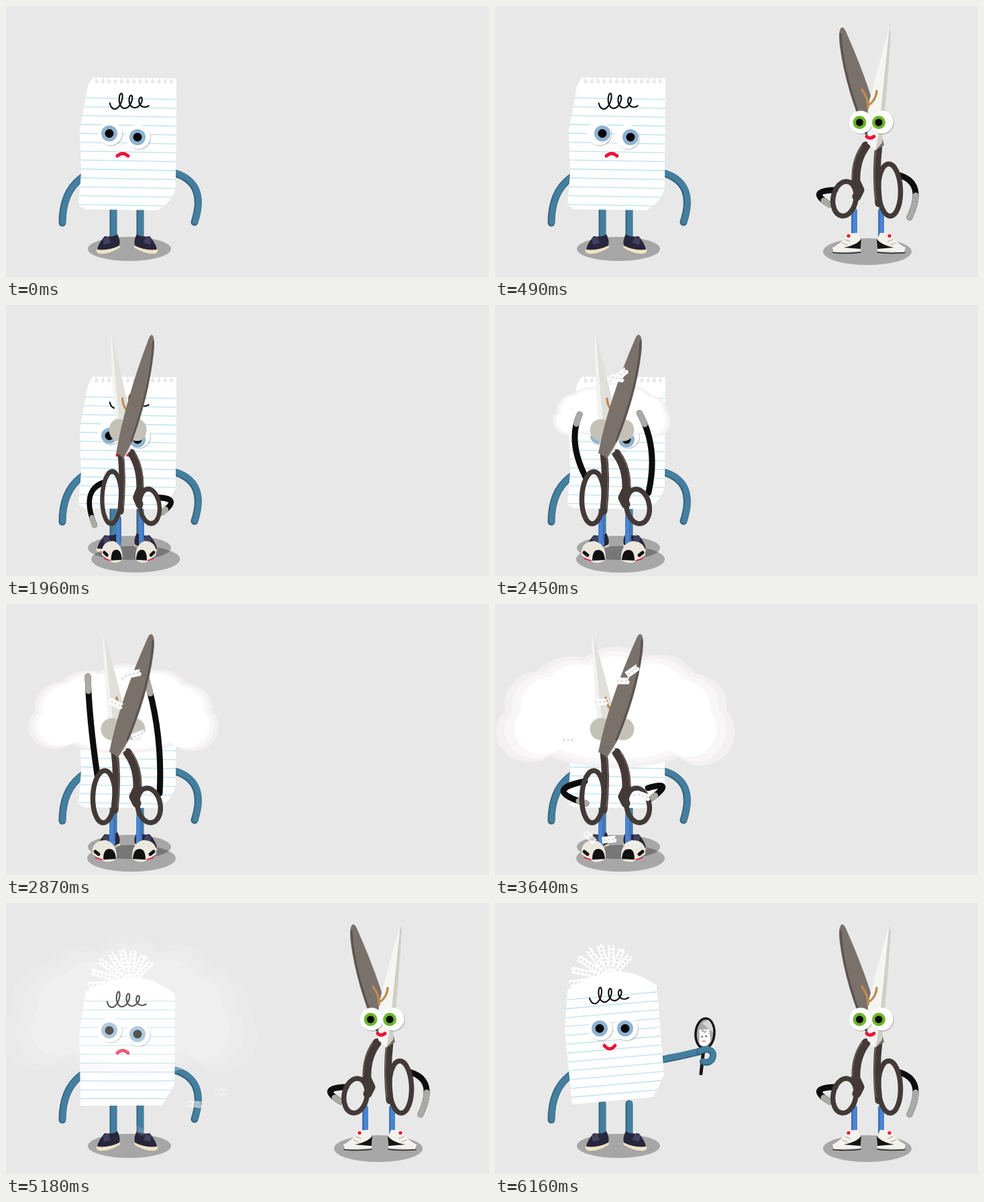
Recreate the animation shown at these times as an HTML page. Size 720x405 px, loop 6.3 s.

```html
<!DOCTYPE html>
<html lang="en">
<head>
<meta charset="utf-8">
<title>Paper and scissors</title>
<style>
html, body { margin: 0; height: 100%; overflow: hidden; background: #e8e8e8; }
svg { display: block; width: 100vw; height: 100vh; }
</style>
</head>
<body>
<svg id="stage" viewBox="0 0 720 405"></svg>
<script>
const LOOP = 6300, STEP = 70, BG = '#e8e8e8';
const TEAL = '#457f9f', DARK = '#433a37', RED = '#ed1238';
const stage = document.getElementById('stage');

// Timing and markup helpers
const ramp = (t, a, b) => Math.min(1, Math.max(0, (t - a) / (b - a)));
const smooth = (t, a, b) => { const u = ramp(t, a, b); return u * u * (3 - 2 * u); };
const easeOut = (t, start) => 1 - (1 - ramp(t, start, start + 660)) ** 3;
const hump = (t, a, b) => Math.sin(Math.PI * ramp(t, a, b));
const mix = (a, b, u) => a + (b - a) * u;
const mixAll = (a, b, u) => a.map((v, i) => mix(v, b[i], u));
const rand = seed => { const v = Math.sin(seed * 12.9898) * 43758.5453; return v - Math.floor(v); };
const repeat = (n, draw) => [...Array(n).keys()].map(draw).join('');

const shape = (d, fill, more = '') => `<path d="${d}" fill="${fill}" ${more}/>`;
const line = (d, color, width, more = '') => shape(d, 'none',
  `stroke="${color}" stroke-width="${width}" stroke-linecap="round" stroke-linejoin="round" ${more}`);
const oval = (x, y, rx, ry, fill, more = '') =>
  `<ellipse cx="${x}" cy="${y}" rx="${rx}" ry="${ry}" fill="${fill}" ${more}/>`;
const dot = (x, y, r, fill) => oval(x, y, r, r, fill);
const group = (transform, inner) => `<g transform="${transform}">${inner}</g>`;
const fade = (opacity, inner) => `<g opacity="${opacity}">${inner}</g>`;
const mirrored = (width, inner) => group(`translate(${width}) scale(-1 1)`, inner);
const bend = p => `M${p[0]} ${p[1]}Q${p.slice(2).join(' ')}`;

const tube = (d, width = 11) =>
  line(d, '#35647f', width) + group('translate(.8 -.8)', line(d, TEAL, width - 2.5));

const eye = (x, y, ix, iy, r, iris, irisR, pupilR) =>
  dot(x + 1.3, y + 1.6, r, '#00000030') + dot(x, y, r, '#fff') +
  dot(ix, iy, irisR, iris) + dot(ix, iy, pupilR, '#080808');

// Perforated paper strip, anchored at its left end
const strip = (x, y, angle, length) => group(`translate(${x} ${y}) rotate(${angle})`,
  shape(`M0 -5H${length}l-2 4 3 2 -2 4H0Z`, '#fbfbfb') +
  repeat(Math.floor(length / 6), i => dot(4 + i * 6, 0, 1.7, '#dedede')));

// ---------- Paper ----------
const OLD_SHEET = 'M129 107L254 108 253 272Q247 294 226 305L118 304 108 298 112 250 110 186 122 120Z';
const NEW_SHEET = 'M108 130Q135 110 170 104T241 123L252 257 236 290 115 301 104 190Z';

const rules = tilt => repeat(13, i => {
  const y = 138.3 + i * 13.3;
  return line(`M100 ${y - tilt}L260 ${y + tilt}`, '#b9e3ee', 1.3);
});

// Handwritten loops that get smaller to the right
const scribble = (() => {
  const points = [];
  for (let s = -.2; s < 3.15; s += .04) {
    const rise = (12.5 - 2 * s) * (1 - Math.cos(2 * Math.PI * s));
    points.push([162 + 15 * s + 5.5 * Math.sin(2 * Math.PI * s) + rise * .1, 154 - s - rise]
      .map(v => v.toFixed(1)));
  }
  return line('M' + points.join('L'), '#0c0c0c', 2.1);
})();

function oldSheet() {
  const holes = repeat(13, i => {
    const x = 135 + i * 9.3;
    return dot(x, 113, 2.7, BG) + line(`M${x} 112l${4 * rand(i) - 2} -8`, BG, 1 + rand(i + 9));
  });
  return shape(OLD_SHEET, '#fff') + `<g clip-path="url(#old)">${rules(1.4)}</g>` + holes + scribble;
}

function newSheet(joy) {
  const tuft = repeat(8, i => strip(172, 112, -188 + i * 20, 62 - i * 2.5));
  return group(`translate(${-4 * (1 - joy)} ${2 * (1 - joy)}) rotate(${5 * (1 - joy)} 115 301)`,
    tuft + shape(NEW_SHEET, '#fff') + `<g clip-path="url(#new)">${rules(-7)}</g>` +
    group('rotate(-5 115 301)', scribble));
}

function paperFace(t, joy) {
  const look = 6 * (smooth(t, 280, 490) - smooth(t, 1540, 1890));
  const down = 5 * (smooth(t, 1540, 1890) - smooth(t, 2800, 3500));
  const pair = (x, y) => eye(x, y, x - 1 + look, y + .5 + down, 18, '#8eb2d0', 12, 6.5);
  const mouth = mixAll([166, 224, 174, 217, 182, 224], [163, 213, 171, 223, 179, 213], joy);
  return pair(mix(155, 157, joy), mix(190, 187, joy)) +
    pair(mix(197, 195, joy), mix(195.5, 187, joy)) + line(bend(mouth), RED, 5);
}

const paperShoe =
  shape('M135 363L169 356 170 361Q152 372 139 370 134 369 135 363Z', '#f3e3c3') +
  shape('M147 344Q160 346 166 341 171 350 169 358 154 366 136 364 137 356 147 344Z', '#27263c') +
  shape('M144 347L153 345 156 354 146 357Z', '#42415e');

// Origin at the hand
const mirror = line('M3 -4L-1 33', '#191716', 5) + group('translate(5 -27) rotate(4)',
  oval(0, 0, 14, 22.5, '#a6a8a9', 'stroke="#191716" stroke-width="3.5"') +
  shape('M3 -21Q12 -15 12 -2L-5 -15Z', '#d4d6d6') +
  shape('M-9 -5L6 -7 9 11 2 20 -7 17Z', '#fafafa') +
  line('M-5 -3q2 -3 3 0t4 -1', '#333', .8) +
  dot(-4, 5, 1.3, '#456') + dot(2, 4, 1.3, '#456') + line('M-3 11q2 2 4 0', RED, 1));

function paperArm(t) {
  const hang = [252, 250, 300, 265, 281, 323];
  const hidden = [252, 250, 272, 275, 235, 270];
  const reach = [249, 234, 278, 229, 305, 222];
  const out = smooth(t, 5390, 5670);
  const arm = mixAll(mixAll(hang, hidden, smooth(t, 5180, 5390)), reach, out);
  const [x, y] = arm.slice(4);
  const held = group(`translate(${x + 3} ${y})`, mirror) +
    tube(`M${x} ${y}c10 -6 21 -3 20 7c-1 8 -9 11 -15 8`, 10);
  return tube(bend(arm)) + (out ? held : '');
}

function paper(t) {
  const joy = smooth(t, 5670, 5950);
  return oval(184, 363, 62, 18, '#a6a6a6') + tube('M160 300V344M200 300V344') +
    paperShoe + mirrored(361, paperShoe) +
    tube('M114 256Q84 277 84 324') + paperArm(t) +
    (t < 4200 ? oldSheet() : newSheet(joy)) + paperFace(t, joy);
}

// ---------- Scissors, drawn facing the viewer ----------
const darkBlade =
  shape('M517 32Q511 35 514 60 523 125 552 192L567 216 580 208Q564 130 523 38 520 31 517 32Z', '#7b716b') +
  line('M515 42Q518 105 553 190', '#5c5350', 3);
const lightBlade = (left, right) =>
  shape('M588 32Q575 75 556 150L555 205 567 216 577 204Q586 110 590 42Z', left) +
  shape('M588 32L571 196 567 216 577 204Q586 110 590 42Z', right);
const ring = (x, y, rx, ry, tilt) =>
  oval(x, y, rx, ry, 'none', `stroke="${DARK}" stroke-width="7.5" transform="rotate(${tilt} ${x} ${y})"`);
const leftHandle = line('M553 209Q537 230 538 262L544 275 539 285', DARK, 13) +
  ring(521, 288, 17, 26, 10) + line('M547 209Q532 230 533 258', '#665a55', 2);
const rightHandle = line('M572 208Q567 250 572 295', DARK, 11) +
  ring(588, 275, 16.5, 39, -2) + line('M568 214Q563 250 568 290', '#665a55', 2);
const fringe = line('M547 125Q557 138 556 152M569 127Q568 141 557 148', '#bd8c50', 3.5);

const frontShoe =
  shape('M503 361Q519 353 525 340L541 339 546 352 545 367 505 368Z', '#f4f1ea') +
  shape('M520 361Q540 357 546 348L545 363Z', '#151515') +
  line('M504 368.5Q525 371 545 368', '#222', 1.4) +
  line('M518 354l7 3M522 349l7 3', '#aaa', 1.3) + dot(527, 343.5, 2.6, RED);
const backShoe = shape('M510 361Q508 340 530 340 547 345 546 367 540 374 528 372Z', '#ece7dc') +
  shape('M526 369Q526 353 535 353T545 368Z', '#111') +
  line('M514 357l5 4', '#111', 5) + line('M514 366l10 3', RED, 1.5);

const feet = (shoe, width) => line('M535.5 306V344M575.5 306V344', '#4a84d0', 9) +
  line('M532.5 306V341M572.5 306V341', '#3a6db4', 2) + shoe +
  group(`translate(570) scale(${width} 1) translate(-570)`, mirrored(1115, shoe));

const sleeve = (arm, bare) => line(bend(arm), '#0e0d0d', 9) +
  line(bend(arm), '#aaa9a4', 9, `pathLength="100" stroke-dasharray="${bare} 200" stroke-dashoffset="${bare - 100}"`);

function sleeves(t, isBack) {
  const swing = (1 + Math.cos((t - 2870) / 1540 * 6 * Math.PI)) / 2;
  const busy = smooth(t, 2030, 2240) * isBack;
  const pose = (rest, low, high) => mixAll(rest, mixAll(low, high, swing), busy);
  return sleeve(pose([507, 275, 464, 276, 499, 297],
      [506, 262, 465, 250, 501, 278], [505, 270, 500, 180, 526, 95]), isBack ? 15 : 22) +
    sleeve(pose([603, 253, 642, 265, 618, 316],
      [600, 252, 665, 265, 598, 285], [598, 242, 610, 160, 612, 95]), isBack ? 15 : 45);
}

function frontScissors(t) {
  const gaze = (x, ix) => eye(x, 173.5, ix, 174, 17, '#6cb52b', 10, 5.5);
  return feet(frontShoe, 1 - .58 * hump(t, 980, 1260)) + sleeves(t, false) +
    leftHandle + rightHandle + darkBlade + lightBlade('#f5f5f2', '#cfcfc8') + fringe +
    gaze(545, 543.5) + gaze(576.5, 572) + line('M554 195Q559 200 565 195', RED, 5);
}

function backScissors(t) {
  const snip = t < 2170 ? 0 : 5 * Math.abs(Math.sin(Math.PI * (t - 2870) / 385));
  return feet(backShoe, 1) + sleeves(t, true) + leftHandle + rightHandle +
    group(`rotate(${-snip} 567 210)`, lightBlade('#e0dfd9', '#f3f3ef') + fringe) +
    dot(576, 174, 16.5, '#c4c2b8') + dot(543, 174, 16.5, '#c4c2b8') +
    group(`rotate(${snip / 2} 567 210)`, darkBlade);
}

function scissors(t) {
  if (t < 280) return '';
  const land = ramp(t, 280, 490) ** 2;
  const bounce = 12 * hump(t, 490, 700) + 5 * hump(t, 1190, 1400);
  const away = easeOut(t, 1470) - easeOut(t, 4200);
  const turn = ramp(t, 1590, 2040) - ramp(t, 4200, 4650);
  const width = Math.cos(Math.PI * turn);
  const x = 555 - 368 * away, y = 13 * away;
  // The body turns around its own axis, the shadow does not
  return oval(x, 367 + y, 66 * land, 20 * land, '#00000048') +
    group(`translate(${x - 8 * away} ${y - 400 * (1 - land) - bounce}) scale(${width} 1) translate(-555)`,
      width > 0 ? frontScissors(t) : backScissors(t));
}

// ---------- Dust and scraps ----------
const puffs = fill => oval(0, .25, .78, .62, fill) + repeat(7, i => {
  const a = Math.PI * i / 6;
  return oval(-.72 * Math.cos(a), .32 - .8 * Math.sin(a), .28 + .06 * Math.sin(a), .46 + .08 * rand(i), fill);
});

function cloud(t) {
  const alpha = 1 - ramp(t, 4200, 5600);
  if (t < 2170 || !alpha) return '';
  const grown = ramp(t, 2700, 4550);
  const w = 190 * (1 - Math.exp((2100 - t) / 560));
  const h = w * mix(.5, .6, grown);
  const layer = (fill, size) => group(
    `translate(${mix(174, 185, grown)} 160) scale(${w * size} ${h * size})`, puffs(fill));
  return fade(alpha, layer('#f4f0f1', 1) + layer('#f8f6f6', .96 - .06 * grown) + layer('#fff', .92 - .14 * grown));
}

function scraps(t) {
  return repeat(9, i => {
    const age = (t - 2170 - i * 190) / 1000;
    if (age < 0 || age > 2) return '';
    const flight = Math.min(age, .9 + .2 * rand(i + 20));
    const x = 175 + 320 * (rand(i + 3) - .5) * flight;
    const y = 115 - 110 * flight + 330 * flight * flight;
    return fade(1 - ramp(age, 1.1, 2), strip(x, Math.min(y, 362), 60 * rand(i) + 40 * flight - 50, 21));
  });
}

const clip = (id, d) => `<clipPath id="${id}"><path d="${d}"/></clipPath>`;
const defs = `<defs>${clip('old', OLD_SHEET)}${clip('new', NEW_SHEET)}</defs>`;
let shown = -1;
function draw() {
  const step = Math.floor(performance.now() % LOOP / STEP);
  if (step !== shown) {
    shown = step;
    const t = Math.min(step * STEP, 6160);
    stage.innerHTML = defs + paper(t) + cloud(t) + scissors(t) + scraps(t);
  }
  requestAnimationFrame(draw);
}
draw();
</script>
</body>
</html>
```
